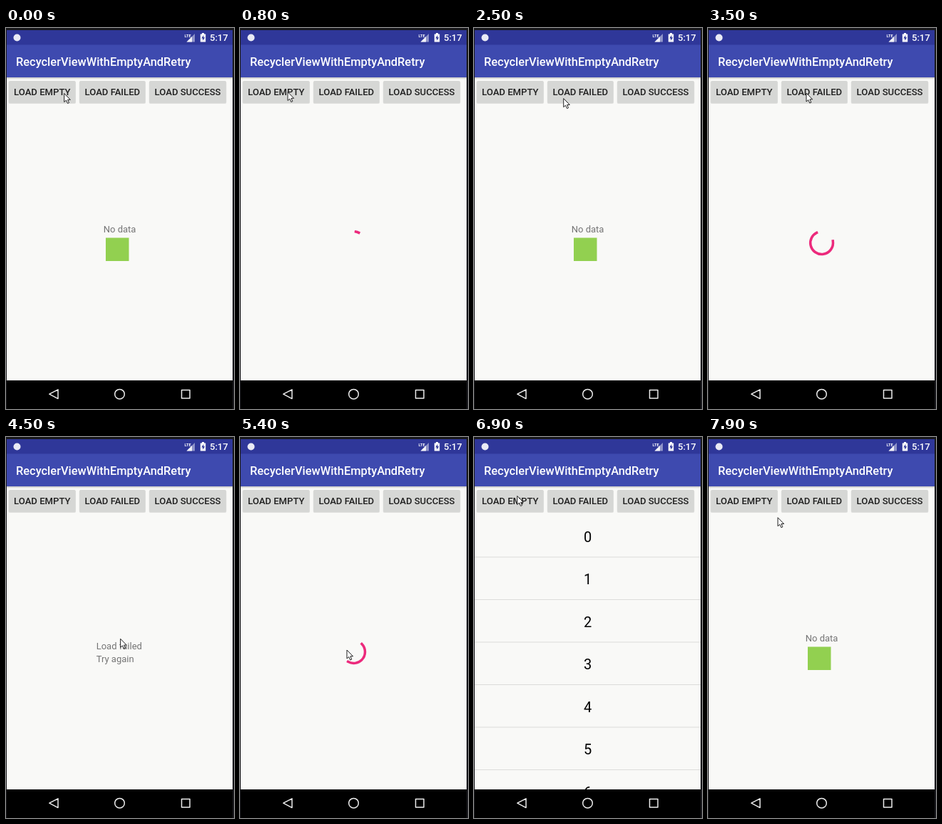
An HTML page for the animation above (8000 ms loop, 320 px wide and 533 px high).

```html
<!DOCTYPE html>
<html lang="en">
<head>
<meta charset="utf-8">
<title>List states</title>
<style>
  html, body { margin: 0; width: 100%; height: 100%; overflow: hidden; background: #000; }
  svg { display: block; width: 100vw; height: 100vh; font-family: Roboto, sans-serif; }
  .medium { font-weight: 500; }
  .middle { text-anchor: middle; }
  .hint { font-size: 13px; fill: #757575; }
  .button { font-size: 13.1px; fill: #202020; }
  .nav { fill: none; stroke: #ececec; stroke-width: 1.5; stroke-linejoin: round; }
</style>
</head>
<body>
<svg viewBox="0 0 320 533">
  <defs>
    <linearGradient id="shade" x2="0" y2="1">
      <stop stop-color="#000" stop-opacity=".22"/>
      <stop offset="1" stop-color="#000" stop-opacity="0"/>
    </linearGradient>
    <clipPath id="page"><rect x="1" y="106" width="317" height="387"/></clipPath>
  </defs>

  <rect width="320" height="533" fill="#18181c"/>
  <rect x="1" y="69" width="317" height="424" fill="#f9f9f7"/>
  <rect x="1" y="3" width="317" height="21" fill="#2f3799"/>
  <rect x="1" y="23.5" width="317" height="45.5" fill="#3e4aaf"/>
  <rect x="1" y="69" width="317" height="3" fill="url(#shade)"/>

  <circle cx="15.5" cy="13.5" r="5" fill="#e9eaf5"/>
  <text x="250.5" y="12.6" font-size="5.6" font-weight="700" fill="#fff">LTE</text>
  <path d="M265 8V19.5H253.5Z" fill="#8f94c9"/>
  <path d="M261 12V19.5H253.5Z" fill="#f2f2f8"/>
  <path d="M275 7h3v1.4h2.2V19.5h-7.4V8.4H275Z" fill="#fff"/>
  <path d="M277.3 10l-3 4.4h1.9v3.4l3-4.6h-1.9Z" fill="#2f3799"/>
  <text class="medium" x="286" y="18" font-size="13" fill="#fff">5:17</text>
  <text class="medium" x="14" y="53" font-size="16.42" fill="#fff">RecyclerViewWithEmptyAndRetry</text>

  <g id="buttons"></g>

  <g clip-path="url(#page)">
    <g id="empty">
      <text class="hint middle" x="159.6" y="286">No data</text>
      <rect x="140" y="293.5" width="32.5" height="32.5" fill="#92d050"/>
    </g>
    <g id="failed">
      <text class="hint" x="126.7" y="297">Load failed</text>
      <text class="hint" x="126.7" y="315">Try again</text>
    </g>
    <g id="list"></g>
    <circle id="loading" cx="159.6" cy="300.6" r="15.9" pathLength="360" fill="none"
      stroke="#ec2a7c" stroke-width="3.5" stroke-linecap="square"/>
  </g>

  <rect x="1" y="493" width="317" height="40" fill="#000"/>
  <path class="nav" d="M73 505.8V518.6L60.8 512.2Z"/>
  <circle class="nav" cx="159.5" cy="512.2" r="6.8"/>
  <rect class="nav" x="246.5" y="506.5" width="11.5" height="11.5"/>

  <path id="cursor" d="M0 0V12L2.8 9.6L4.8 14L6.8 13.1L4.9 8.8H8.6Z"
    fill="#fff" stroke="#202020" stroke-width="1" stroke-linejoin="round"/>
</svg>
<script>
const LOOP = 8000, STEP = 100, LOAD_TIME = 500, ROW = 59.5;
const $ = id => document.getElementById(id);

// Each stroke of the mouse bends from the previous end, by way of a control point.
const home = [81.7, 91.5];
const strokes = [
  { from: 0, until: 300, bend: [74, 91], end: [67, 89.5] },
  { from: 2000, until: 2700, bend: [100, 119], end: [138, 91] },
  { from: 3800, until: 4680, bend: [220, 205], end: [150, 298] },
  { from: 6080, until: 6700, bend: [132, 90], end: [60.7, 82.5] },
  { from: 7800, until: 7900, bend: [80, 98], end: [98, 112.7] }
];

// Every load shows the spinner first, then its result.
const loads = [
  { start: 800, result: 'empty' }, { start: 3100, result: 'failed' },
  { start: 5200, result: 'list' }, { start: 7100, result: 'empty' }
];

let left = 4;
$('buttons').innerHTML = [['LOAD EMPTY', 93.5], ['LOAD FAILED', 92.3], ['LOAD SUCCESS', 107.7]]
  .map(([label, width]) => {
    const x = left;
    left += width + 5.7;
    return `
      <rect x="${x - .5}" y="74.5" width="${width + 1}" height="31.5" rx="2" opacity=".1"/>
      <rect x="${x}" y="74" width="${width}" height="31" rx="1.5" fill="#d6d7d5"/>
      <text class="button medium middle" x="${x + width / 2}" y="94.2">${label}</text>`;
  }).join('');

$('list').innerHTML = Array.from({ length: 7 }, (_, i) => `
  <text class="middle" x="159.5" y="${146.5 + i * ROW}" font-size="20">${i}</text>
  <rect x="1" y="${167.5 + i * ROW}" width="317" height="1" fill="#dcdcda"/>`).join('');

const clamp = u => Math.min(1, Math.max(0, u));
const easeInOut = u => u < .5 ? 2 * u * u : 1 - 2 * (1 - u) ** 2;

// Cubic bezier (.4, 0, .2, 1), solved for x by bisection.
function fastOutSlowIn(x) {
  let lo = 0, hi = 1, s;
  for (let i = 0; i < 20; i++) {
    s = (lo + hi) / 2;
    const bx = 1.2 * (1 - s) ** 2 * s + .6 * (1 - s) * s * s + s ** 3;
    if (bx < x) lo = s; else hi = s;
  }
  return 3 * (1 - s) * s * s + s ** 3;
}

function cursorAt(t) {
  return strokes.reduce((start, { from, until, bend, end }) => {
    const s = easeInOut(clamp((t - from) / (until - from)));
    return start.map((a, i) => (1 - s) ** 2 * a + 2 * s * (1 - s) * bend[i] + s * s * end[i]);
  }, home);
}

function drawSpinner(age) {
  const sweep = 11 + 259 * fastOutSlowIn(clamp(age / 667));
  const angle = age * (90 / 1333 + 720 / 6665) - 90;
  const ring = $('loading');
  ring.setAttribute('stroke-dasharray', `${sweep} ${360 - sweep}`);
  ring.setAttribute('transform', `rotate(${angle} 159.6 300.6)`);
}

function draw(now) {
  const t = Math.floor(now % LOOP / STEP) * STEP;
  $('cursor').setAttribute('transform', `translate(${cursorAt(t)})`);

  const load = loads.findLast(l => l.start <= t) || { start: -LOAD_TIME, result: 'empty' };
  const age = t - load.start;
  const view = age < LOAD_TIME ? 'loading' : load.result;
  for (const id of ['empty', 'failed', 'list', 'loading']) {
    $(id).style.display = id === view ? '' : 'none';
  }
  drawSpinner(age + 60);
}

const start = performance.now();
function tick() {
  draw(performance.now() - start);
  requestAnimationFrame(tick);
}
tick();
</script>
</body>
</html>
```
